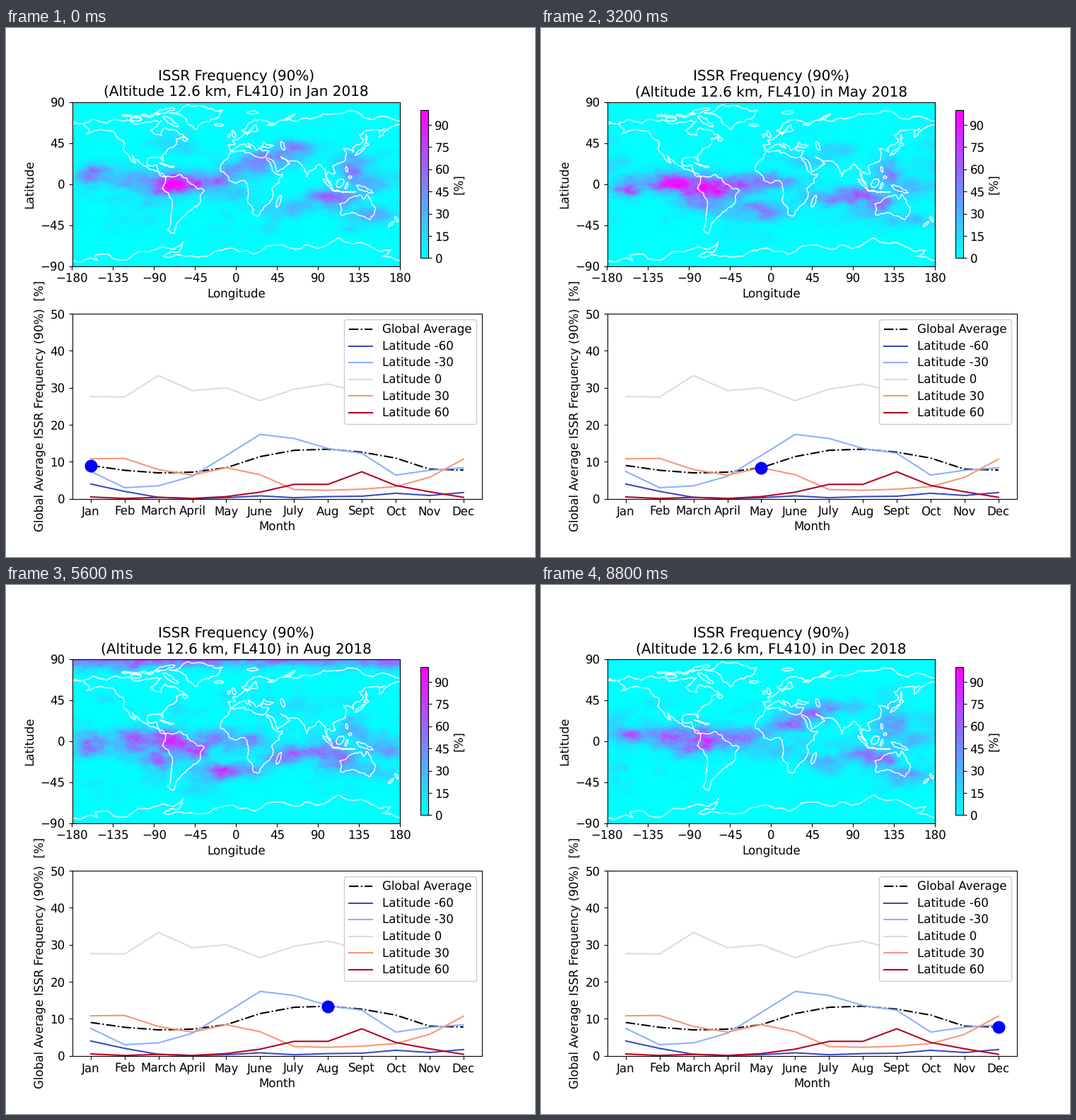
Recreate the animation shown at these times as a matplotlib script. Size 748 px wide and 748 px high, loop 9600 ms.

```python
import numpy as np
import matplotlib.pyplot as plt
from matplotlib.animation import FuncAnimation

plt.rcParams.update({"font.size": 12, "font.family": "DejaVu Sans", "text.hinting": "none"})

MONTHS = ["Jan", "Feb", "March", "April", "May", "June",
          "July", "Aug", "Sept", "Oct", "Nov", "Dec"]
GLOBAL_MEAN = [9, 7.7, 7, 7.2, 8.4, 11.4, 13.1, 13.4, 12.6, 11, 8, 7.8]
SERIES = {
    "Latitude -60": [4, 2, .4, .1, .3, .8, .3, .6, .7, 1.5, .9, 1.7],
    "Latitude -30": [7.4, 3, 3.5, 6.1, 11.7, 17.4, 16.3, 13.6, 12.3, 6.4, 7.7, 8.4],
    "Latitude 0": [27.6, 27.5, 33.3, 29.2, 30, 26.5, 29.6, 31, 28.7, 28.5, 28.5, 28],
    "Latitude 30": [10.8, 10.9, 7.9, 6.4, 8.4, 6.5, 2.5, 2.3, 2.6, 3.3, 5.8, 10.7],
    "Latitude 60": [.5, .1, .4, .1, .6, 1.8, 3.9, 3.9, 7.3, 3.6, 1.9, .4],
}

# Moist regions: lon, January lat, July lat, width, height, January %, July %
REGIONS = np.array([
    [-158, 8, -5, 13, 7, 66, 54],      # central Pacific
    [-110, 6, -2, 18, 8, 46, 84],      # eastern Pacific
    [-74, 1, -1, 15, 9, 92, 84],       # Amazon
    [-50, 4, -10, 15, 8, 54, 72],      # Brazil
    [-86, -7, -20, 14, 8, 36, 58],     # off Peru
    [-24, 7, 2, 17, 7, 50, 56],        # tropical Atlantic
    [-10, -9, -33, 22, 7, 24, 56],     # South Atlantic
    [12, 18, -6, 17, 6, 50, 34],       # Sahel
    [38, 26, 28, 20, 6, 52, 6],        # Arabia
    [70, 37, 38, 18, 6, 32, 12],       # central Asia
    [62, -24, -12, 19, 6, 30, 46],     # western Indian Ocean
    [95, -14, -10, 16, 6, 40, 82],     # Java
    [110, -18, -22, 14, 8, 48, 52],    # western Australia
    [127, 17, 13, 11, 10, 46, 30],     # Philippines
    [152, 2, -7, 17, 8, 34, 30],       # New Guinea
    [147, -38, -36, 18, 6, 36, 26],    # Tasman Sea
])
LON, LAT = np.meshgrid(np.arange(-179.5, 180), np.arange(89.5, -90, -1))


def noise(rng, slope):
    """Smooth noise, periodic in longitude and stretched along the parallels."""
    ky = np.fft.fftfreq(180)[:, None] * 180
    kx = np.fft.fftfreq(360)[None, :] * 360
    k2 = (.9 * kx) ** 2 + ky ** 2 + 16
    n = np.fft.ifft2(np.fft.fft2(rng.standard_normal(LON.shape)) * k2 ** (-slope / 2)).real
    return n / n.std()


def humidity(month):
    rng = np.random.default_rng(40 + month)
    x = LON + 4 * noise(rng, 1.9)
    y = LAT + 2 * noise(rng, 1.9)
    summer = (1 - np.cos(2 * np.pi * month / 12)) / 2

    total = np.zeros(LON.shape)
    for lon, lat0, lat1, w, h, amp0, amp1 in REGIONS:
        lat = lat0 + (lat1 - lat0) * summer
        amp = amp0 + (amp1 - amp0) * summer
        dx = (x - lon + 180) % 360 - 180
        total += (amp * np.exp(-.5 * ((dx / w) ** 2 + ((y - lat) / h) ** 2))) ** 2

    # the Arctic cap is moist from June to October, its core drifting eastwards
    cap = 58 * np.clip(1.6 * np.sin(np.pi * (month - 4) / 6.2), 0, 1)
    core = 1 + .25 * np.cos(np.radians(LON + 110 - 200 * (month > 8)))
    total += (cap * core * np.exp(-.5 * ((y - 91) / 6) ** 2)) ** 2

    haze = np.clip(noise(rng, 2.2) - .3, 0, None) * 7 * np.exp(-(LAT / 60) ** 4)
    return np.clip(np.sqrt(total) * np.exp(.2 * noise(rng, 1.5)) + haze, 0, 99)


# ---- coastlines: a few key points, roughened by midpoint displacement ----
coasts = []
coast_rng = np.random.default_rng(7)


def coast(*coords, rounds=3):
    pts = np.reshape(coords, (-1, 2)).astype(float)
    for _ in range(rounds):
        step = np.diff(pts, axis=0)
        normal = step[:, ::-1] * [1, -1]
        bend = coast_rng.uniform(-.17, .17, (len(step), 1))
        out = np.empty((2 * len(pts) - 1, 2))
        out[::2], out[1::2] = pts, pts[:-1] + step / 2 + normal * bend
        pts = out
    coasts.append(pts)


def island(lon, lat, length, width, tilt=0):
    """Rough ellipse given by its half axes and its tilt in degrees."""
    a = np.linspace(0, 2 * np.pi, 9)
    z = (length * np.cos(a) + 1j * width * np.sin(a)) * np.exp(1j * np.radians(tilt))
    coast(np.stack([lon + z.real, lat + z.imag], 1), rounds=2)


# North America, both shores
coast(-168, 66, -156, 71, -128, 70, -95, 68, -82, 69, -94, 59, -82, 53, -78, 62, -66, 59,
      -56, 52, -66, 50, -65, 44, -75, 38, -81, 31, -80, 25, -84, 30, -97, 28, -97, 20,
      -87, 21, -84, 11, -77, 8)
coast(-77, 8, -95, 16, -106, 23, -114, 31, -110, 23, -124, 40, -124, 48, -135, 58, -150, 60,
      -164, 55, -161, 60, -168, 66)
# South America
coast(-77, 8, -62, 10.6, -50, 0, -35, -7, -40, -21, -48, -27, -58, -36, -66, -45, -68, -54,
      -75, -50, -71, -30, -70, -18, -81, -5, -77, 8)
# Greenland
coast(-73, 78, -32, 83.5, -15, 81, -20, 73, -40, 65, -44, 60, -52, 65, -55, 72, -73, 78)
# Europe and Siberia
coast(-6, 36, -9, 43, -1, 44, -4, 48, 8, 54, 10, 57, 12, 54, 24, 59, 22, 65, 17, 60, 13, 56,
      6, 59, 14, 67, 26, 71, 41, 67, 35, 65, 44, 67, 68, 69, 73, 72, 104, 77, 140, 73, 180, 69)
# Eastern and southern Asia
coast(180, 65, 163, 58, 157, 51, 157, 58, 163, 61, 142, 59, 135, 54, 140, 48, 128, 40, 129, 35,
      126, 38, 118, 39, 121, 32, 119, 25, 106, 20, 109, 12, 100, 13, 104, 1, 98, 9, 98, 16,
      91, 22, 80, 15, 77, 8, 73, 19, 67, 25, 51, 28, 49, 30, 56, 25, 59, 22, 45, 13, 35, 29)
coast(-180, 69, -170, 66, -180, 65)
# Mediterranean and Black Sea
coast(-6, 36, 3, 42, 9, 44, 16, 39, 13, 45, 22, 37, 27, 40, 30, 46, 41, 42, 28, 41, 28, 37,
      36, 36, 33, 31, 20, 31, 10, 34, 10, 37, -6, 36)
# Africa
coast(-6, 36, -17, 21, -17, 14, -8, 4, 9, 4, 13, -8, 12, -17, 19, -34, 26, -34, 35, -22,
      40, -14, 39, -5, 51, 11, 43, 12, 33, 29)
# Australia
coast(114, -22, 115, -34, 131, -32, 138, -35, 147, -39, 153, -28, 143, -11, 140, -17, 136, -12,
      130, -13, 122, -18, 114, -22)
# Antarctica
coast(-180, -84, -152, -84, -155, -78, -100, -74, -68, -72, -58, -63, -62, -74, -80, -79,
      -40, -80, -12, -71, 50, -67, 70, -71, 80, -67, 145, -67, 170, -72, 160, -79, 180, -84)

island(-72, 69, 10, 2.6, -35)       # Baffin
island(-78, 80, 11, 2.2, 15)        # Ellesmere
island(-110, 71, 6, 2)              # Victoria
island(-56, 49, 2.6, 2)             # Newfoundland
island(-79, 21.5, 5, .7, -18)       # Cuba
island(-71, 19, 2.8, .8)            # Hispaniola
island(-19, 65, 5, 1.4)             # Iceland
island(-2.5, 54.5, 4.4, 1.7, 110)   # Britain
island(-8, 53.3, 2, 1.5, 60)        # Ireland
island(59, 73.5, 7, 1.2, 30)        # Novaya Zemlya
island(18, 78.5, 6, 1.4)            # Svalbard
island(51, 41.8, 5, 1.9, 110)       # Caspian Sea
island(47, -19, 7, 2, 70)           # Madagascar
island(100.5, 0, 8, 1.4, -47)       # Sumatra
island(110, -7.4, 4.8, .6, -6)      # Java
island(114, 1, 5.5, 3.6, 50)        # Borneo
island(121, -2, 4, 1.2, 70)         # Sulawesi
island(141, -5.5, 10, 2.4, -24)     # New Guinea
island(121.5, 16, 3, 1.2, 100)      # Luzon
island(125, 7.5, 1.8, 1.6)          # Mindanao
island(136, 36, 7, 1.2, 40)         # Honshu
island(143, 43.5, 2.5, 1.6)         # Hokkaido
island(142.8, 50, 4, .7, 90)        # Sakhalin
island(176, -38.5, 3.4, 1.3, -60)   # New Zealand
island(170, -44, 4, 1.2, 45)
for lon in range(-122, -84, 7):     # smaller Arctic islands
    island(lon, coast_rng.uniform(73, 78), 3.4, 1, coast_rng.uniform(-20, 20))
for lon in range(117, 131, 4):      # Lesser Sundas
    island(lon, -8.7, 1.6, .4, 8)

# ---- figure ----
fig, (world, chart) = plt.subplots(2, 1, figsize=(7.48, 7.48), dpi=100)

image = world.imshow(humidity(0), cmap="cool", vmin=0, vmax=100, extent=(-180, 180, -90, 90))
for line in coasts:
    world.plot(*line.T, color="white", lw=1)
world.set(xlim=(-180, 180), ylim=(-90, 90), xlabel="Longitude", ylabel="Latitude",
          xticks=range(-180, 181, 45), yticks=range(-90, 91, 45))
title = world.set_title("ISSR Frequency (90%)\n")
fig.colorbar(image, ax=world, shrink=.8, label="[%]", ticks=range(0, 91, 15))

chart.plot(MONTHS, GLOBAL_MEAN, "k-.", label="Global Average")
for i, (name, values) in enumerate(SERIES.items()):
    chart.plot(MONTHS, values, color=plt.cm.coolwarm(i / 4), label=name)
marker, = chart.plot([0], [GLOBAL_MEAN[0]], "bo", ms=12)
chart.set(ylim=(0, 50), xlabel="Month",
          ylabel="Global Average ISSR Frequency (90%)  [%]")
chart.legend(loc="upper right", framealpha=1, labelspacing=.43)


def update(i):
    image.set_data(humidity(i))
    title.set_text(f"ISSR Frequency (90%)\n(Altitude 12.6 km, FL410) in {MONTHS[i]} 2018")
    marker.set_data([i], [GLOBAL_MEAN[i]])
    return image, title, marker


anim = FuncAnimation(fig, update, frames=12, interval=800, repeat=True, repeat_delay=0)
plt.show()
```
